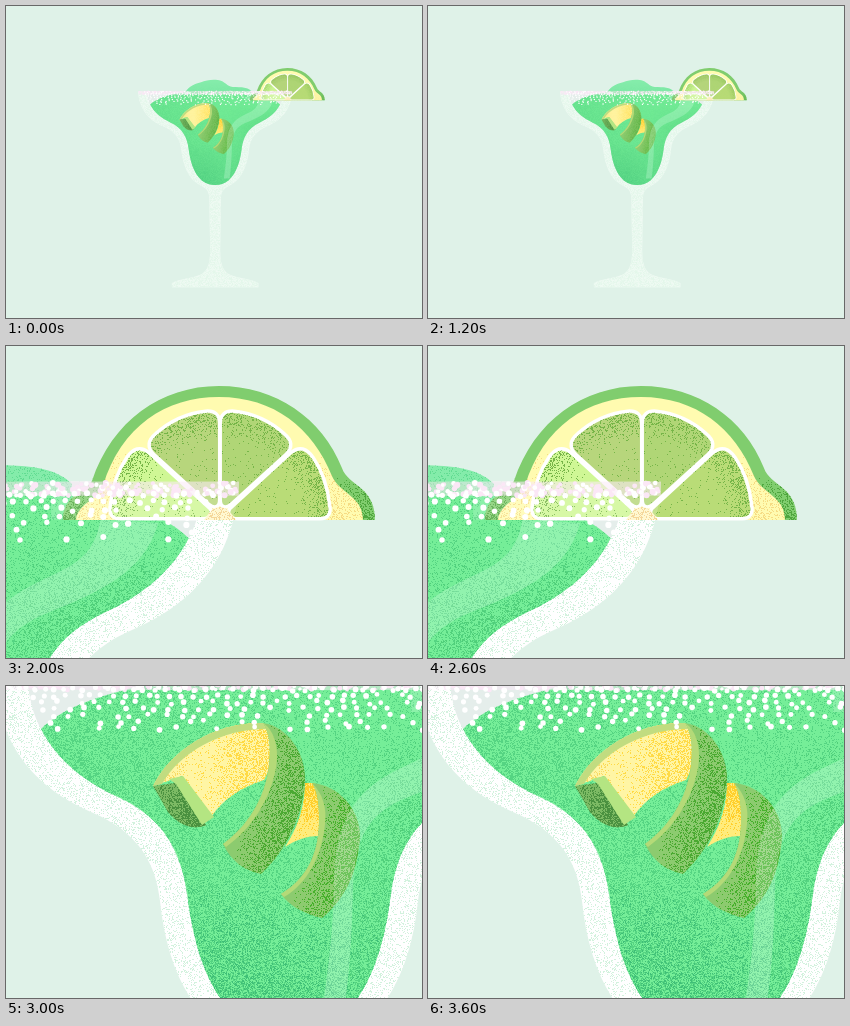
Write an HTML page with a canvas that moves like this. It is 416 by 312 pixels and loops after 4000 ms.

```html
<!DOCTYPE html>
<html lang="en">
<head>
<meta charset="utf-8">
<title>Lime cocktail</title>
<style>
  html, body { margin: 0; width: 100%; height: 100%; overflow: hidden; background: #dff2e8; }
  canvas { display: block; }
</style>
</head>
<body>
<canvas id="stage" width="416" height="312"></canvas>
<script>
const W = 416, H = 312, LOOP = 4000;

// Camera for each shot: start time, zoom, offset of the drink and haze of the glass.
const SHOTS = [
  { at: 0, zoom: 0.262, x: 135, y: 87.3, haze: 0.5 },
  { at: 2000, zoom: 1.092, x: -397.1, y: 145.4, haze: 0.17 },
  { at: 3000, zoom: 1, x: 0, y: 0, haze: 0.2 }
];

const clamp = v => Math.max(0, Math.min(1, v));
const ramp = (a, b, v) => clamp((v - a) / (b - a));

let seed = 1;
function rnd() {
  seed = (seed + 0x6D2B79F5) | 0;
  let t = Math.imul(seed ^ (seed >>> 15), 1 | seed);
  t = (t + Math.imul(t ^ (t >>> 7), 61 | t)) ^ t;
  return ((t ^ (t >>> 14)) >>> 0) / 4294967296;
}

function layer() {
  const c = document.createElement('canvas');
  c.width = W;
  c.height = H;
  return c.getContext('2d');
}

function mirror(d, axis) {
  const p = new Path2D();
  p.addPath(new Path2D(d), new DOMMatrix([-1, 0, 0, 1, axis * 2, 0]));
  return p;
}

function both(d, axis) {
  const p = new Path2D(d);
  p.addPath(mirror(d, axis));
  return p;
}

const MID = 283;
const BOWL = 'C52 76 81 97 112 111 C160 133 175 168 181 207 C187 257 200 303 232 333 C248 345 265 350 283 350';
const glass = both('M-11 -9 C-8 50 20 98 85 126 C135 147 150 180 154 215 C160 275 182 325 220 347 ' +
  'C248 362 260 370 261 400 L264 600 C264 660 250 685 220 695 C180 708 130 712 118 725 L118 740 L283 740 L283 -9 Z', MID);
const hollow = both('M22 -9 C22 10 27 28 35 43 ' + BOWL + ' L283 -9 Z', MID);
const liquid = both('M35 43 ' + BOWL + ' L283 -9 L190 -9 C110 2 60 18 35 43 Z', MID);
const froth = new Path2D('M172 -9 C185 -24 200 -36 229 -42 C250 -52 285 -55 305 -48 C325 -40 325 -30 350 -24 C385 -24 408 -22 424 -7 L424 0 L172 0 Z');
const streak = new Path2D('M450 26 C445 62 420 70 395 82 C345 105 330 140 328 190 C328 240 322 285 316 325 ' +
  'L338 325 C346 270 346 230 347 200 C350 150 362 130 395 114 C450 92 490 75 503 29 Z');

const rind = new Path2D('M57 174 C57 150 78 147 86 135 C106 75 155 40 213 40 C270 40 316 72 336 122 C342 140 369 140 369 174 Z');
const pith = new Path2D('M70 174 C72 158 89 155 97 140 C115 80 160 51 213 51 C268 51 307 82 326 130 C334 148 357 150 357 174 Z');
const SIDE = 'M114 171 Q104 171 106 160 Q109 132 122 113 Q131 99 142 108 L203 164 Q206 171 196 171 Z';
const TOP = 'M149 107 Q140 98 151 89 Q172 70 200 67 Q212 66 212 78 L212 153 Q212 163 204 157 Z';
const wedges = [
  [new Path2D(SIDE), '#cff795'],
  [new Path2D(TOP), '#b7d67c'],
  [mirror(TOP, 214), '#b0d676'],
  [mirror(SIDE, 214), '#b9dc77']
];

const peelInside = new Path2D('M147 100 C165 64 208 36 257 37 C270 58 266 80 258 94 C236 101 218 112 205 131 L176 90 Z');
const peelRim = new Path2D('M147 100 C165 64 208 36 257 37 L260 43 C216 43 174 66 156 98 Z');
const peelEnd = new Path2D('M147 100 L170 97 L200 139 C186 145 172 138 162 126 Z');
const peelCut = new Path2D('M163 93 L177 90 L208 131 L196 139 L170 98 Z');
const curl = new Path2D('M257 37 C284 41 300 70 299 95 C297 130 280 165 255 188 C240 185 225 176 217 158 C242 140 259 112 263 80 C265 62 264 48 257 37 Z');
const curlEdge = new Path2D('M257 37 C270 45 273 66 270 82 C264 114 246 142 220 161 L217 158 C242 140 259 112 263 80 C265 62 264 48 257 37 Z');
const loopInside = new Path2D('M299 97 L308 97 C319 115 317 138 312 150 C300 150 290 154 279 161 C291 143 299 121 299 97 Z');
const loop = new Path2D('M306 97 C335 100 354 125 354 150 C352 185 340 212 316 232 C300 228 285 222 275 208 C302 192 314 165 313 130 C313 115 311 105 306 97 Z');
const loopEdge = new Path2D('M306 97 C317 108 321 122 319 138 C316 170 301 198 278 211 L275 208 C302 192 314 165 313 130 C313 115 311 105 306 97 Z');

function paint(shot) {
  const g = layer();
  const far = shot.zoom < 0.5;
  seed = 7 + shot.at;

  const fill = (path, color) => {
    g.fillStyle = color;
    g.fill(path);
  };

  // Scatter specks inside a path; from afar they blend into a soft tone.
  const grain = (path, color, density) => {
    const inv = g.getTransform().inverse();
    const n = layer();
    const img = n.createImageData(W, H);
    for (let y = 0, i = 3; y < H; y++) {
      for (let x = 0; x < W; x++, i += 4) {
        const d = density(inv.a * x + inv.e, inv.d * y + inv.f);
        const r = rnd();
        img.data[i] = 255 * (far ? d * (0.7 + 0.6 * r) : r < d);
      }
    }
    n.putImageData(img, 0, 0);
    n.globalCompositeOperation = 'source-in';
    n.fillStyle = color;
    n.fillRect(0, 0, W, H);
    g.save();
    g.clip(path);
    g.resetTransform();
    g.drawImage(n.canvas, 0, 0);
    g.restore();
  };

  const dot = (x, y, r, color) => {
    g.fillStyle = color;
    g.beginPath();
    g.arc(x, y, r, 0, Math.PI * 2);
    g.fill();
  };

  function drawGlass() {
    fill(glass, '#ffffff');
    grain(glass, '#d3f2de', () => shot.haze);
    fill(hollow, '#e5eeeb');
    fill(froth, '#84ecaa');
    grain(froth, '#62dc92', (x, y) => 0.25 * ramp(-45, 0, y));
    fill(liquid, '#75ee98');
    grain(liquid, '#55d482', (x, y) => 0.16 + 0.25 * ramp(40, 300, y) + 0.25 * ramp(300, 60, x));
    grain(liquid, '#3fbf77', (x, y) => 0.4 * ramp(190, 350, y) * (1 - 0.6 * ramp(250, 350, x)));
    grain(liquid, '#4fce78', (x, y) => 0.35 * ramp(330, 450, x) * ramp(50, 130, y));
  }

  function drawLime() {
    g.save();
    g.translate(363.6, -133.2);
    g.scale(1 / 1.092, 1 / 1.092);
    fill(rind, '#80cd6e');
    grain(rind, '#4fa63e', (x, y) => 0.5 * ramp(130, 174, y));
    fill(pith, '#fffbb0');
    grain(pith, '#f6dc84', (x, y) => 0.3 * ramp(105, 174, y));
    g.strokeStyle = '#ffffff';
    g.lineWidth = 7;
    for (const [path] of wedges) g.stroke(path);
    for (const [path, color] of wedges) {
      fill(path, color);
      grain(path, '#76b548', (x, y) => 0.03 + 1.3 * Math.max(0, Math.hypot(x - 214, y - 174) / 108 - 0.76));
    }
    const core = new Path2D('M198 174 Q214 148 230 174 Z');
    fill(core, '#fff7c8');
    grain(core, '#f2cf86', () => 0.3);
    g.restore();

    // The glass lies in front of the lime.
    g.save();
    g.beginPath();
    g.rect(405, -9, 175, 35);
    g.clip();
    fill(glass, 'rgba(255,255,255,.16)');
    g.restore();
  }

  function drawPeel() {
    fill(peelInside, '#fff5a4');
    grain(peelInside, '#ffda45', (x, y) => 0.06 + 0.55 * ramp(200, 265, x));
    grain(peelInside, '#f7da6a', (x, y) => 0.35 * ramp(185, 155, x));
    fill(peelRim, '#c1dc80');
    fill(peelEnd, '#7cba64');
    grain(peelEnd, '#4a9140', (x, y) => 0.2 + 0.55 * ramp(150, 190, x));
    fill(peelCut, '#b4e582');
    fill(loopInside, '#ffec7c');
    grain(loopInside, '#ffcf2c', (x, y) => 0.7 * ramp(155, 105, y));
    fill(loop, '#8ccb6f');
    grain(loop, '#46b02b', (x, y) => 0.8 * ramp(300, 365, x + (y - 160) * 0.25));
    fill(loopEdge, '#b4da78');
    fill(curl, '#8ccb6f');
    grain(curl, '#4aa931', (x, y) => 0.75 * ramp(240, 315, x + (y - 110) * 0.3));
    fill(curlEdge, '#b4da78');
  }

  function drawShine() {
    g.save();
    g.clip(liquid);
    fill(streak, 'rgba(225,255,238,.25)');
    g.restore();
  }

  function drawSalt() {
    g.fillStyle = 'rgba(250,232,246,.5)';
    g.fillRect(-11, -9, 588, 13);
    for (let i = 0; i < 420; i++) {
      dot(-9 + rnd() * 584, -8 + rnd() * 12, 1.6 + rnd() * 1.2, i % 3 ? '#fbe7f6' : '#ffffff');
    }
    for (let row = 0; row < 7; row++) {
      const y = 3 + row * 6.6;
      const step = 10 + row * 1.5;
      for (let x = 18 + row * 3 + (row % 2) * step / 2; x < 548 - row * 3; x += step) {
        if (rnd() < row * 0.07) continue;
        dot(x + (rnd() - 0.5) * step * 0.4, y + (rnd() - 0.5) * 4, 2.4 + rnd() * 0.5, '#ffffff');
      }
    }
  }

  g.fillStyle = '#dff2e8';
  g.fillRect(0, 0, W, H);
  g.setTransform(shot.zoom, 0, 0, shot.zoom, shot.x, shot.y);
  drawGlass();
  drawLime();
  drawPeel();
  drawShine();
  drawSalt();
  return g.canvas;
}

const views = SHOTS.map(paint);
const stage = document.getElementById('stage').getContext('2d');
const start = performance.now();
let shown = -1;

function tick() {
  const t = (performance.now() - start) % LOOP;
  const now = SHOTS.filter(s => s.at <= t).length - 1;
  if (now !== shown) {
    shown = Math.max(0, now);
    stage.drawImage(views[shown], 0, 0);
  }
  requestAnimationFrame(tick);
}
tick();
</script>
</body>
</html>
```
